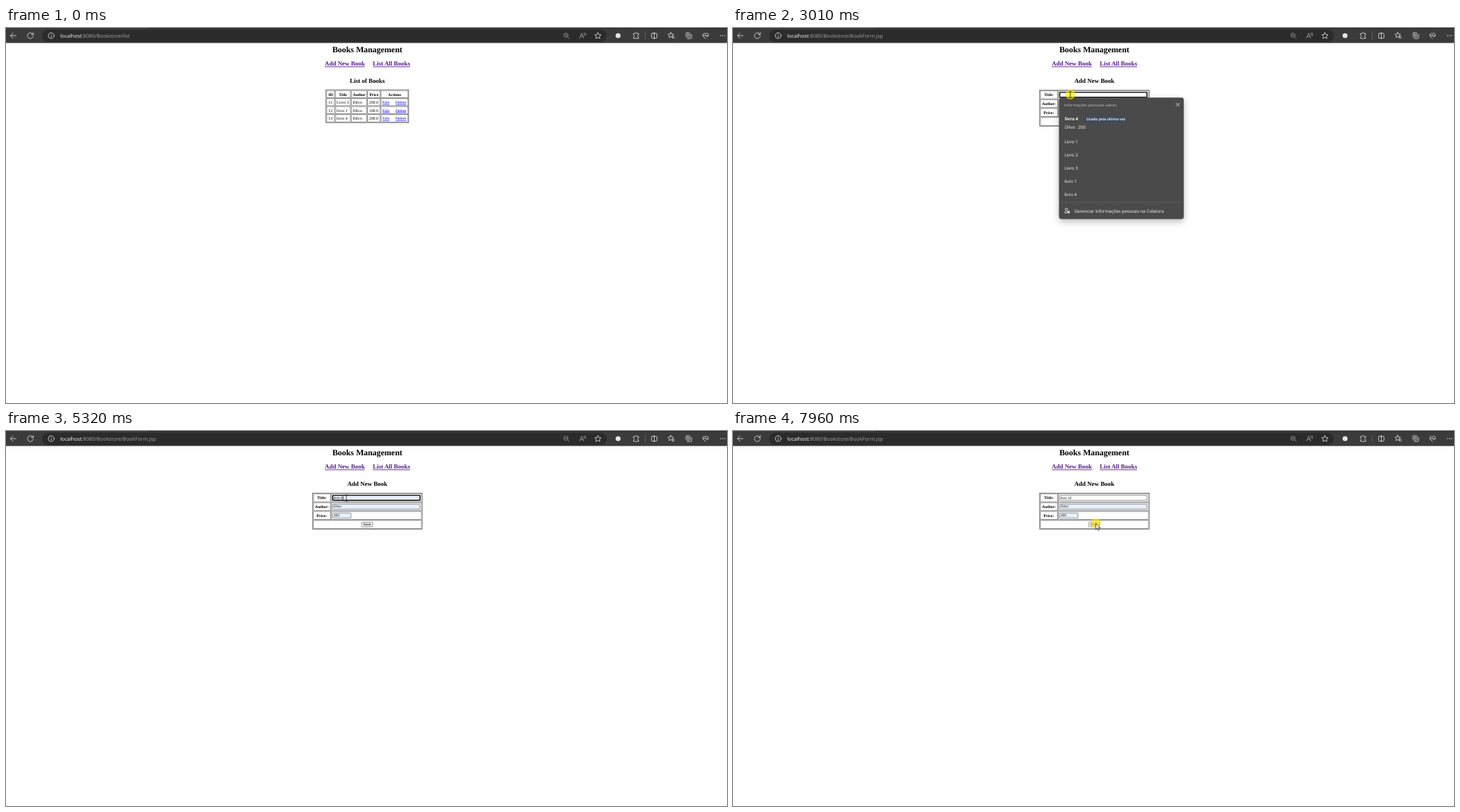
Animation of 1036 by 540 pixels, one loop 8000 ms. Source, as an HTML page:

```html
<!DOCTYPE html>
<html lang="en">
<head>
<meta charset="utf-8">
<title>Books Management</title>
<style>
html, body { margin: 0; width: 100%; height: 100%; overflow: hidden; background: #fff; }
svg { display: block; width: 1036px; height: 540px; text-rendering: geometricPrecision; }
text { white-space: pre; }
.serif { font-family: "Liberation Serif", Times, serif; }
.sans { font-family: "Liberation Sans", Arial, sans-serif; }
.ui { font-family: "Open Sans", "Noto Sans", sans-serif; }
.b { font-weight: 700; }
.mid { text-anchor: middle; }
.link { text-decoration: underline; }
.icon { fill: none; stroke: #d6d6d6; stroke-width: .9; stroke-linecap: round; stroke-linejoin: round; }
.cell { fill: none; stroke: #5f5f5f; stroke-width: .7; }
.panel { filter: drop-shadow(0 4px 5px rgba(0,0,0,.25)); }
</style>
</head>
<body>
<svg id="stage" viewBox="0 0 1036 540"></svg>
<script>
const LOOP = 8000, AUTHOR = 'Dilvo';
const BASE = 5.93, FIELD = 4.85, UI = 6.25;

const text = (x, y, size, str, cls, fill = '#000', extra = '') =>
  `<text x="${x}" y="${y}" font-size="${size}" class="${cls}" fill="${fill}" ${extra}>${str}</text>`;
const rect = (x0, y0, x1, y1, attrs) =>
  `<rect x="${x0}" y="${y0}" width="${x1 - x0}" height="${y1 - y0}" ${attrs}/>`;
const path = (d, extra = '') => `<path d="${d}" ${extra}/>`;
const group = (id, body, extra = '') => `<g id="${id}" ${extra}>${body}</g>`;
const cell = (x0, y0, x1, y1) => rect(x0, y0, x1, y1, 'class="cell"');

function star(cx, cy, r) {
  let d = '';
  for (let i = 0; i < 10; i++) {
    const a = -Math.PI / 2 + i * Math.PI / 5, k = i % 2 ? r * .48 : r;
    d += (i ? 'L' : 'M') + (cx + k * Math.cos(a)).toFixed(2) + ' ' + (cy + k * Math.sin(a)).toFixed(2);
  }
  return path(d + 'Z');
}

function toolbar() {
  const dim = 'stroke="#9a9a9a"';
  return rect(0, 0, 1036, 21.6, 'fill="#3b3b3b"') +
    rect(204, 0, 1036, 1, 'fill="#252525"') +
    rect(52, 2.5, 863, 20, 'rx="8.7" fill="#2b2b2b"') +
    '<g class="icon">' +
    path('M14.5 11H6.5M10 7.2L6.3 11L10 14.8') +
    group('reload', path('M38.8 9.2A4.2 4.2 0 1 0 39.2 11.6M39.2 6.6V9.4H36.4')) +
    group('stop', path('M31.8 7.8L38.2 14.2M38.2 7.8L31.8 14.2')) +
    '<circle cx="65" cy="11" r="4.1"/>' + path('M65 10.6V13.2M65 8.8V8.9') +
    `<g style="stroke:#9a9a9a"><circle cx="804.6" cy="10.4" r="3"/>${path('M803.2 10.4H806M807 12.8L809.4 15.2')}` +
    path('M824.3 14.6L827.2 7.4L830.1 14.6M825.3 12.2H829.1M830.4 7.6Q831.6 8.8 830.8 10.4M832 6.8Q833.6 8.8 832.6 11') + '</g>' +
    star(850.5, 11.3, 4.8) +
    path('M901.8 8H904.2A1.4 1.4 0 0 1 907 8H909V10A1.5 1.5 0 0 0 909 13V15H901.8V12.8A1.5 1.5 0 0 0 901.8 10Z') +
    path('M918.5 6V16', 'style="stroke:#686868"') +
    rect(927.6, 7.6, 935.4, 14.6, 'rx="1.2"') + path('M931.5 6.6V15.6') +
    star(955.2, 10.4, 4.2) + path('M957.6 12H960.4M957.6 14.4H960.4') +
    rect(977, 7, 983, 13, 'rx="1.2"') + path('M979 15.2H984A1.4 1.4 0 0 0 985.2 14V9.6M980 8.6V11.4M978.6 10H981.4') +
    path('M1005 15.2L1001.5 11.6A2.4 2.4 0 0 1 1005 8.4A2.4 2.4 0 0 1 1008.8 11.4L1007.4 13M1001.4 11H1004L1005 9.8L1006 12L1007 11H1009') +
    '</g>' +
    '<circle cx="879.5" cy="11" r="3.6" fill="#e4e4e4"/>' +
    [1026.8, 1029.8, 1032.8].map(x => `<circle cx="${x}" cy="11" r=".8" fill="#d6d6d6"/>`).join('') +
    text(78, 13.7, 7.36, '<tspan fill="#fff">localhost</tspan>:8080/Bookstore/<tspan id="url"></tspan>', 'ui', '#a3a3a3');
}

function heading() {
  const visited = '#551a8b';
  return text(519.2, 35, 11.86, 'Books Management', 'serif b mid') +
    text(458, 54.4, 8.95, 'Add New Book', 'serif b link', visited) +
    text(527, 54.4, 8.95, 'List All Books', 'serif b link', visited) +
    text(519.2, 79.3, 8.95, '', 'serif b mid', '#000', 'id="caption"');
}

function listTable() {
  const cols = [460.5, 472.8, 495.8, 519.4, 538.6, 578.6], rows = [89.8, 101.3, 112.8, 124.4, 136.1];
  const books = [[11, 'Livro 3', '200.0'], [12, 'livro 1', '100.0'], [13, 'livro 4', '200.0']];
  let s = cell(459.6, 88.9, 578.8, 136.5);
  for (let r = 0; r < 4; r++)
    for (let c = 0; c < 5; c++)
      s += cell(cols[c] + .4, rows[r] + .3, cols[c + 1] - .9, rows[r + 1] - .9);
  ['ID', 'Title', 'Author', 'Price', 'Actions'].forEach((h, i) =>
    s += text((cols[i] + cols[i + 1]) / 2 - .2, 97.7, BASE, h, 'serif b mid'));
  books.forEach(([id, title, price], i) => {
    const y = 108.9 + i * 11.6;
    s += text(463.2, y, BASE, id, 'serif') + text(475, y, BASE, title, 'serif') +
      text(498.2, y, BASE, AUTHOR, 'serif') + text(521.7, y, BASE, price, 'serif') +
      text(541, y, BASE, 'Edit', 'serif link', '#00e') + text(559.7, y, BASE, 'Delete', 'serif link', '#00e');
  });
  return s;
}

function formTable() {
  const input = 'stroke="#767676" stroke-width=".8" rx=".6" fill="#fff"';
  let s = cell(440.6, 89.2, 598.2, 141.4);
  ['Title:', 'Author:', 'Price:'].forEach((label, i) => {
    const y = 90.4 + i * 12.75;
    s += cell(441.8, y, 466.4, y + 11.6) + cell(467.8, y, 597, y + 11.6) +
      text(453.9, y + 7.7, BASE, label, 'serif b mid');
  });
  return s + cell(441.8, 128.7, 597, 140.3) +
    rect(469.5, 92.6, 594.8, 99.8, input + ' id="titleBox"') +
    rect(469.5, 105.3, 594.8, 112.5, input + ' class="auto"') +
    rect(469.5, 118.1, 495.8, 125.3, input + ' class="auto"') +
    text(470.9, 97.8, FIELD, '', 'sans', '#111', 'id="title"') +
    group('filled', text(470.9, 110.4, FIELD, AUTHOR, 'sans', '#111') + text(470.9, 123.2, FIELD, '200', 'sans', '#111')) +
    rect(511, 131.2, 527, 138, 'rx=".8" fill="#efefef" stroke="#767676" stroke-width=".7"') +
    text(519, 136.2, FIELD, 'Save', 'sans mid') +
    rect(0, 93.3, .7, 99.1, 'id="caret"');
}

function panel(id, bottom, body) {
  const foot = bottom - 24;
  return group(id,
    rect(468.6, 100.3, 647.6, bottom, 'class="panel" rx="3.5" fill="#4a4a4a" stroke="#626262" stroke-width=".6"') +
    text(475.6, 112.5, 5.72, 'Informações pessoais salvas', 'ui', '#bdbdbd') +
    path('M636.6 107.9L641.4 112.7M641.4 107.9L636.6 112.7', 'class="icon"') + body +
    path(`M468.8 ${foot}H647.4`, 'stroke="#606060" stroke-width=".8"') +
    `<g class="icon" transform="translate(480 ${foot + 12})"><circle cx="-1" cy="-2" r="1.7"/>` +
    path('M-.5 3.2H-3.4V2Q-3.2 .9 -1 .9') + rect(.6, .8, 3.4, 3.4, 'fill="#fff" stroke-width=".5"') + '</g>' +
    text(490.5, foot + 14.8, UI, 'Gerenciar informações pessoais na Coletora', 'ui', '#fff'));
}

function fullPanel() {
  const hover = (id, y0, y1) => rect(472, y0, 645, y1, `id="${id}" rx="1.5" fill="#757575"`);
  let s = hover('hoverTop', 121, 153.3) + hover('hoverRow', 154.3, 173) +
    text(476.8, 133.3, UI, 'livro 4', 'ui b', '#fff') +
    rect(503.2, 125.3, 568, 137.1, 'id="pill" rx="5.9"') +
    text(535.7, 133.1, 5.3, 'Usado pela última vez', 'ui mid', '#fff', 'id="pillText"') +
    text(476.8, 144.8, UI, AUTHOR, 'ui', '#fff') + text(495.8, 144.8, UI, '200', 'ui', '#fff');
  ['Livro 1', 'Livro 2', 'Livro 3', 'livro 1', 'livro 4'].forEach((n, i) =>
    s += text(476.2, 165.8 + i * 19, UI, n, 'ui', '#fff'));
  return panel('full', 275, s);
}

function pointers() {
  const skin = 'fill="#fff" stroke="#111" stroke-width=".7" stroke-linejoin="round"';
  return group('pointer',
    '<circle id="glow" r="7" fill="#ffe600" fill-opacity=".65"/>' +
    path('M0 0V9L2.1 7.1L3.5 10.3L5 9.6L3.6 6.6H6.4Z', skin + ' id="arrow"') +
    path('M-.9 .8Q0 -.6 .9 .8V4.2L4.6 5Q5.6 5.4 5.4 6.6L4.6 11.2H-.8L-3 7.4Q-3 6 -.9 7.2Z', skin + ' id="hand"') +
    path('M-1.8 -4.6H-.5L0 -4.2L.5 -4.6H1.8M0 -4.2V4.2M-1.8 4.6H-.5L0 4.2L.5 4.6H1.8', 'id="beam" fill="none" stroke="#222" stroke-width=".8"'));
}

document.getElementById('stage').innerHTML =
  rect(0, 0, 1036, 540, 'fill="#fff"') + toolbar() + heading() +
  group('list', listTable()) + group('form', formTable()) + fullPanel() +
  panel('short', 166, text(476.2, 133.3, UI, 'livro 1', 'ui', '#fff')) + pointers();

const el = {};
document.querySelectorAll('[id]').forEach(n => el[n.id] = n);
const autos = document.querySelectorAll('.auto');
const show = (id, on) => el[id].setAttribute('display', on ? 'inline' : 'none');
const within = (t, a, b) => t >= a && t < b;

// start, end, number of steps, then the points passed
const START = [1164, 697];
const MOVES = [
  [390, 670, 5, [503, 125.5]],
  [940, 1700, 11, [481, 58]],
  [1830, 1900, 2, [481, 50]],
  [2460, 2580, 3, [481, 64]],
  [2650, 2790, 3, [484.6, 95.8]],
  [3330, 4100, 12, [489, 162], [492, 142.5]],
  [4400, 4970, 8, [489, 97.2]],
  [5040, 5040, 1, [489, 96.7]],
  [6650, 6650, 1, [505, 100.5]],
  [6720, 6790, 2, [507, 119]],
  [6990, 7760, 11, [543, 129], [521.3, 132.8]]
];
const CLICKS = [[1900, 2040], [2790, 3070], [4170, 4310], [7960, 8000]];

function pointerAt(t) {
  let at = START;
  for (const [t0, t1, n, ...stops] of MOVES) {
    if (t < t0) break;
    const gap = (t1 - t0) / (n - 1) || 1;
    const i = Math.min(n - 1, Math.floor((t - t0) / gap + 1e-6));
    const f = 1 - Math.pow(1 - (i + 1) / n, 1.5);
    const pts = [at, ...stops], legs = stops.length;
    const k = Math.min(legs - 1, Math.floor(f * legs)), u = f * legs - k;
    at = [0, 1].map(a => pts[k][a] + (pts[k + 1][a] - pts[k][a]) * u);
  }
  return at;
}

function titleAt(t, topHover, rowHover) {
  if (t >= 6190) return 'livro 10';
  if (t >= 5850) return 'livro 1';
  if (t >= 5520) return 'livro ';
  if (t >= 4310 || topHover) return 'livro 4';
  return rowHover ? 'Livro 1' : '';
}

function draw(t) {
  const form = t >= 2390, filled = t >= 4310;
  const loading = within(t, 1970, 2460);
  const [x, y] = pointerAt(t);

  show('reload', !loading);
  show('stop', loading);
  show('list', !form);
  show('form', form);
  el.url.textContent = form ? 'BookForm.jsp' : 'list';
  el.caption.textContent = form ? 'Add New Book' : 'List of Books';

  const full = within(t, 3010, 4310) || within(t, 5520, 5850);
  const topHover = within(t, 3010, 4310) && y > 121 && y <= 153.5;
  const rowHover = within(t, 3010, 4310) && y > 153.5;
  show('full', full);
  show('short', within(t, 5850, 6250));
  show('hoverTop', topHover);
  show('hoverRow', rowHover);
  el.pill.setAttribute('fill', topHover ? '#bcbcbc' : '#404b58');
  el.pillText.setAttribute('fill', topHover ? '#333' : '#fff');
  el.pillText.setAttribute('font-weight', topHover ? 400 : 600);

  const focus = within(t, 2790, 7960), title = titleAt(t, topHover, rowHover);
  el.title.textContent = title;
  el.titleBox.setAttribute('stroke', focus ? '#000' : '#767676');
  el.titleBox.setAttribute('stroke-width', focus ? 1.4 : .8);
  el.titleBox.setAttribute('fill', title && t < 5520 ? '#e8f0fe' : '#fff');
  autos.forEach(n => n.setAttribute('fill', filled ? '#e8f0fe' : '#fff'));
  show('filled', filled);
  show('caret', within(t, 5320, 6650) || within(t, 7190, 7720));
  if (form) el.caret.setAttribute('x', 470.9 + el.title.getComputedTextLength());

  const hand = within(t, 1830, 2460);
  const overField = within(y, 92, 101) || (!full && within(y, 105, 113)) || (!full && x < 496 && within(y, 118, 126));
  const beam = t >= 2650 && overField;
  show('pointer', t >= 390);
  show('hand', hand);
  show('beam', beam);
  show('arrow', !hand && !beam);
  show('glow', CLICKS.some(([a, b]) => within(t, a, b)));
  el.pointer.setAttribute('transform', `translate(${x.toFixed(2)} ${y.toFixed(2)})`);
}

let begin = null;
function tick(now) {
  if (begin === null) begin = now;
  draw((now - begin) % LOOP);
  requestAnimationFrame(tick);
}
draw(0);
requestAnimationFrame(tick);
</script>
</body>
</html>
```
